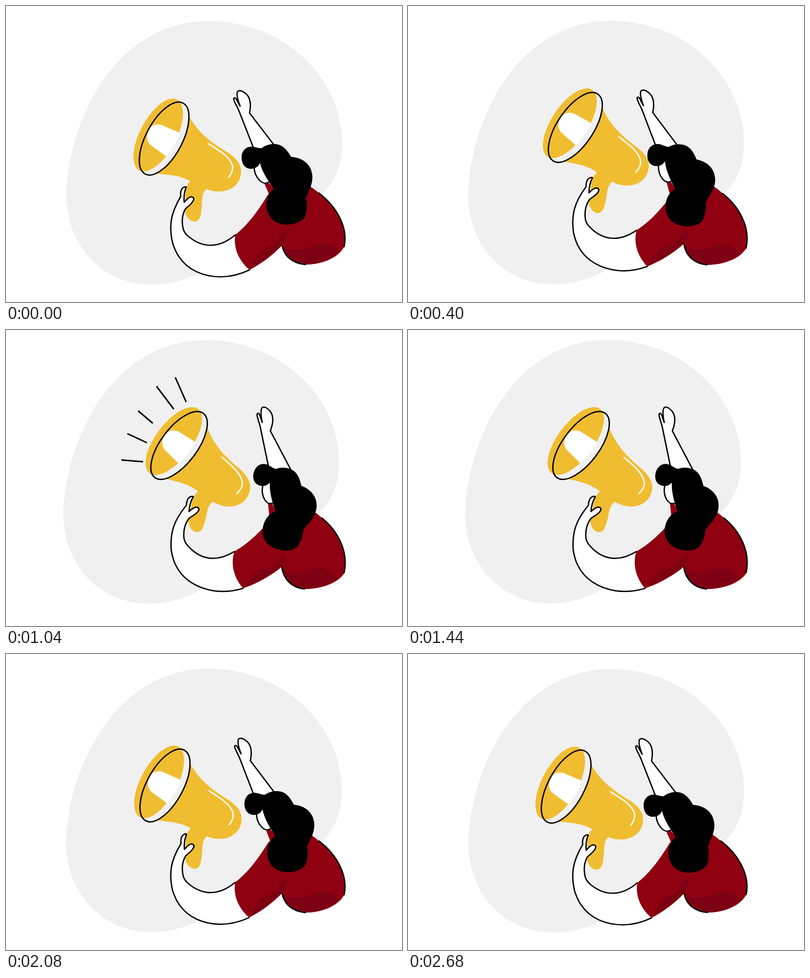
An HTML page that plays this animation: 800x600 px, repeating every 3.72 s.

```html
<!DOCTYPE html>
<html lang="en">
<head>
<meta charset="utf-8">
<title>Megaphone</title>
<style>
  html, body { margin: 0; width: 100%; height: 100%; overflow: hidden; background: #fff; }
  svg { display: block; width: 100%; height: 100%; }
  .ink { stroke: #000; stroke-width: 2.7; stroke-linecap: round; stroke-linejoin: round; }
  .line { fill: none; }
  .skin { fill: #fff; }
  .gold { fill: #f0bd31; }
  .red { fill: #8f0011; }
  .shade { fill: #7e0013; }
  .pale { fill: #f0f0f0; }
</style>
</head>
<body>
<svg viewBox="0 0 800 600">
  <path id="blob" class="pale" d="M410 30.5C560 30.5 679 145 679 278C679 330 660 360 636 384C560 455 480 490 400 535C370 555 330 564.5 294 564.5C190 564.5 122 480 122 385C122 335 135 268 165 205C215 100 300 30.5 410 30.5Z"/>

  <path id="rays" class="line" stroke="#000" stroke-width="3"/>

  <g id="raised">
    <path class="skin ink" d="M505 300L499 285C490 262 479 234 470 211C465 200 460 193 460 188C461 185 464 186 466 190L473 203C468 190 465 178 468 173C472 170 479 173 485 178C495 187 495 202 492 217L541 281L550 293"/>
  </g>

  <g class="head">
    <path class="red" d="M522 360L531 357L545 372L535 388L531 381Z"/>
    <path class="skin" d="M530 357L550 350L542 371Z"/>
    <path class="skin ink" d="M502 318C499 335 506 348 514 355C520 360 526 360 530 357"/>
    <path class="skin" d="M503 318L530 356L550 352L530 310Z"/>
  </g>

  <g class="reach">
    <path class="gold" d="M366 217C385 252 405 270 440 292C462 305 475 318 475 335C475 360 455 376 431 376C420 376 412 374 405 371C393 381 398 398 394 420C392 433 387 437 380 437C371 436 364 428 361 416L363 380C362 370 366 362 372 355C350 343 330 342 303 340Z"/>
    <ellipse class="pale" rx="36.7" ry="81.4" transform="translate(319.5 268.8) rotate(28)"/>
    <ellipse class="gold" rx="36.7" ry="81.4" transform="translate(307.5 261.6) rotate(28)"/>
    <path class="skin" d="M351 257C345 276 335 292 324 305L291 281C284 274 283 263 288 252C293 242 303 238 314 241Z"/>
    <ellipse class="line ink" rx="36.7" ry="81.4" transform="translate(319.5 268.8) rotate(28)"/>
    <path class="line" stroke="#fff" stroke-width="2.8" stroke-linecap="round" d="M409 279C424 289 444 300 453 314C461 325 458 337 450 347"/>
    <path class="skin ink" d="M492 535C475 543 455 549 434 549C400 549 368 536 350 509C343 500 339 487 337 482C333 466 332 448 334 434C337 415 346 398 353 386C352 380 353 375 355 371C358 367 362 366 364 367C360 377 359 387 360 398C364 393 368 388 373 387C378 386 381 390 378 395C374 403 366 407 362 412C356 423 355 435 357 447C358 457 364 464 371 469C385 480 398 485 413 485C431 485 449 476 463 464"/>
    <path class="red" d="M463 464C485 446 502 427 530 381L570 400L570 470L557 486C540 503 520 520 492 535C472 518 459 493 463 464Z"/>
  </g>

  <path id="torso" class="red"/>
  <path id="hip" class="shade"/>
  <g class="reach">
    <path class="shade" d="M494 533C500 512 512 493 530 488C548 483 555 456 567 455C570 465 562 480 557 486C540 503 520 520 494 533Z"/>
  </g>
  <path id="back" class="line ink"/>
  <path id="seat" class="line ink"/>

  <g class="head">
    <path d="M497 285C505 286 512 289 517 288C524 282 535 279 545 280C558 281 567 290 576 306C600 307 618 322 619 346C619 368 608 378 606 392C609 400 608 410 606 422C602 436 585 443 567 443C540 443 526 425 526 403C526 388 533 376 541 371C530 355 518 338 513 318C510 326 503 330 495 330C483 330 476 320 476 307C476 294 484 285 497 285Z"/>
  </g>
</svg>

<script>
const LOOP = 3720, STEP = 40;

// Keys are [time, value] pairs, eased in and out between neighbours.
const tracks = {
  reach: [[0, 0], [680, 1], [1470, 1], [2197, 0]],
  raise: [[280, 0], [1040, 1], [1568, 1], [2156, 0]],
  drift: [[280, 0], [1160, 1], [1517, 1], [2215, 0]],
  tilt: [[120, 0], [720, 1], [1684, 1], [2170, 0.06], [2680, 0]],
  sway: [[0, 0], [400, 1], [740, 0], [1500, 0], [1760, 0.5], [2080, -1], [2240, -0.9], [2680, 0]],
  rayOuter: [[580, 0], [720, 1]],
  rayInner: [[1140, 0], [1320, 1]]
};

// Each shape has a lowered and a lifted pose.
const poses = {
  torso: [
    "M531 380L575 362L612 364C620 369 626 374 632 379C666 405 692 447 683 488C672 510 640 524 605 524C580 522 562 508 558 486L545 450Z",
    "M540 378L575 362L612 361C622 367 631 374 638 381C668 405 693 447 684 492C672 512 640 525 603 525C580 523 561 508 557 480L545 450Z"
  ],
  hip: [
    "M560 488C575 497 595 497 612 488C632 476 660 480 674 499C655 517 630 524 605 524C585 522 567 510 561 494Z",
    "M560 485C575 495 595 496 612 487C635 478 655 483 669 503C650 518 630 525 603 525C585 523 566 510 560 490Z"
  ],
  back: ["M632 379C666 405 692 447 683 488", "M638 381C668 405 693 447 683 492"],
  seat: ["M558 486C562 508 580 522 605 524", "M557 480C561 508 580 523 603 525"]
};

// Inner end, then outer end.
const rays = [
  [277, 267, 233, 263.5],
  [284.5, 228.5, 245, 210],
  [296.5, 189, 267, 164],
  [339, 160.5, 304, 114],
  [364, 146, 342, 96]
];

const $ = id => document.getElementById(id);
const lerp = (a, b, k) => a + (b - a) * k;
const ease = u => (1 - Math.cos(Math.PI * u)) / 2;

function valueAt(keys, t) {
  const next = keys.findIndex(key => key[0] > t);
  if (next === 0) return keys[0][1];
  if (next < 0) return keys[keys.length - 1][1];
  const [t0, v0] = keys[next - 1], [t1, v1] = keys[next];
  return lerp(v0, v1, ease((t - t0) / (t1 - t0)));
}

function mixPath([from, to], k) {
  const ends = to.match(/[\d.]+/g);
  let i = 0;
  return from.replace(/[\d.]+/g, n => lerp(+n, +ends[i++], k).toFixed(2));
}

function rayPath(inner, outer) {
  if (outer - inner < 0.01) return "";
  return rays.map(([x0, y0, x1, y1]) => {
    const point = k => `${lerp(x0, x1, k)} ${lerp(y0, y1, k)}`;
    return `M${point(inner)}L${point(outer)}`;
  }).join("");
}

function setTransform(selector, value) {
  document.querySelectorAll(selector).forEach(el => el.setAttribute("transform", value));
}

function draw(t) {
  const v = {};
  for (const name in tracks) v[name] = valueAt(tracks[name], t);
  setTransform("#blob", `translate(${-6.5 * v.drift} ${-10.5 * v.drift})`);
  setTransform("#raised", `rotate(${9.7 * v.raise} 587 458)`);
  setTransform(".reach", `rotate(${8.9 * v.reach} 558 445)`);
  setTransform(".head", `translate(${-2.6 * v.sway} ${1.5 * v.sway}) rotate(${17.1 * v.tilt} 553 380)`);
  for (const name in poses) $(name).setAttribute("d", mixPath(poses[name], v.reach));
  $("rays").setAttribute("d", rayPath(v.rayInner, v.rayOuter));
}

const start = performance.now();
function tick() {
  const t = (performance.now() - start) % LOOP;
  draw(Math.floor(t / STEP) * STEP);
  requestAnimationFrame(tick);
}
tick();
</script>
</body>
</html>
```
